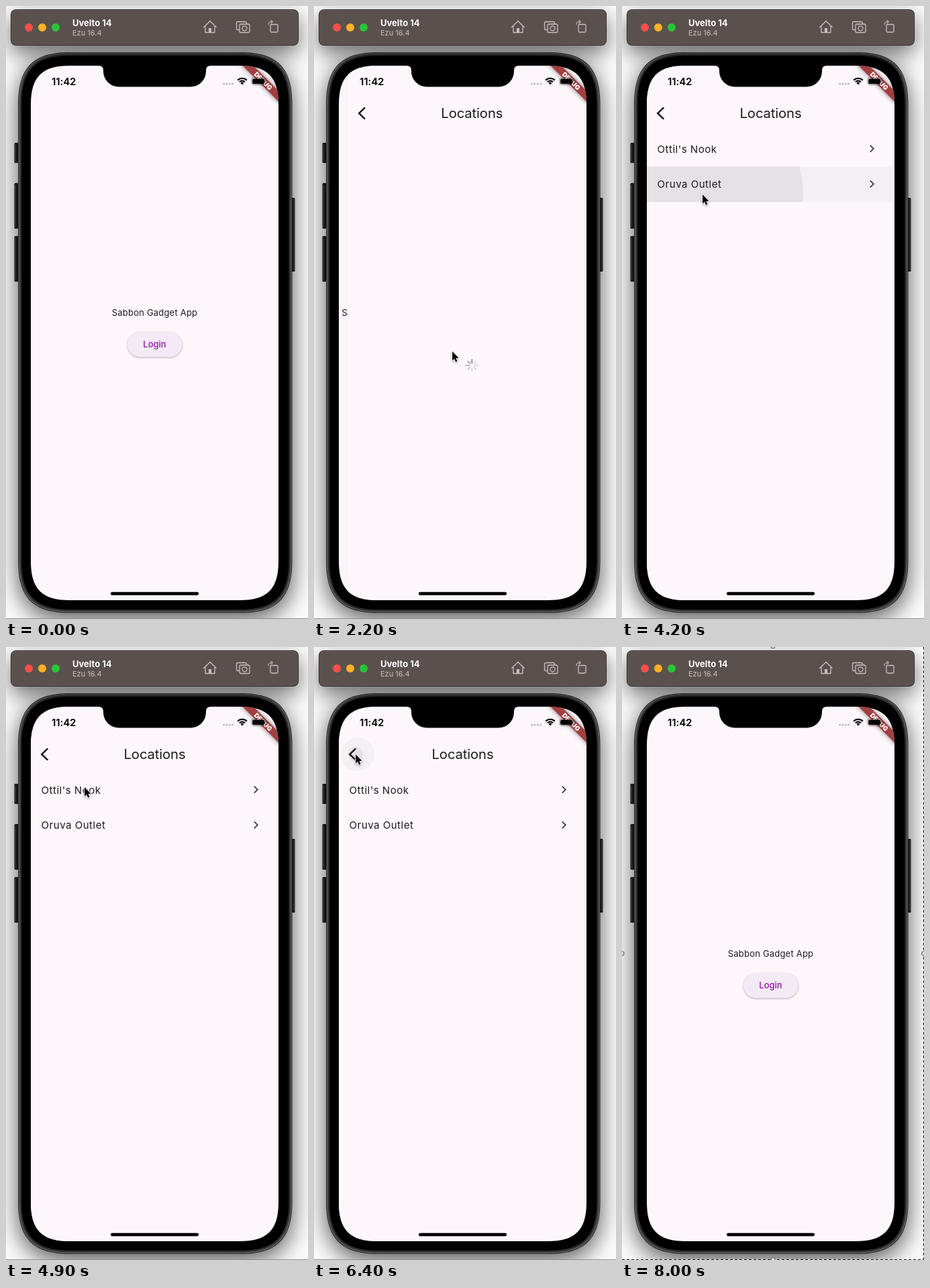
These frames come from a looping animation (450x914 px, 8.9 s). An HTML page with a canvas:

```html
<!DOCTYPE html>
<html lang="en">
<head>
<meta charset="utf-8">
<title>Phone demo</title>
<style>
html, body { margin: 0; width: 100%; height: 100%; overflow: hidden; background: #fff; }
canvas { display: block; }
</style>
</head>
<body>
<canvas id="stage" width="450" height="914"></canvas>
<script>
const ctx = document.getElementById('stage').getContext('2d');
const W = 450, H = 914, LOOP = 8900, STEP = 100;
const SCREEN = { x: 37, y: 89, w: 369, h: 797 };
const MID = SCREEN.x + SCREEN.w / 2;
const ROW = { y: 187, h: 52.6 };
const PAGE = '#fdf7fc', INK = '#1d1b1e', TOOL = '#c6c1bf';

// Pointer stops, and the glides between them
const STOP = {
  below: [230, 838], near: [201, 522], login: [206, 515],
  second: [120, 281], first: [117, 209], back: [62, 160], away: [-4, 260]
};
const GLIDES = [
  { from: 900, to: 1400, stop: STOP.near },
  { from: 1500, to: 1800, stop: STOP.login },
  { from: 2700, to: 3900, stop: STOP.second },
  { from: 4400, to: 4700, stop: STOP.first },
  { from: 5300, to: 5700, stop: STOP.back },
  { from: 6800, to: 7200, stop: STOP.away }
];

const clamp = v => Math.max(0, Math.min(1, v));
const smooth = v => v * v * (3 - 2 * v);
const lerp = (a, b, f) => a + (b - a) * f;

function pointerAt(t) {
  return GLIDES.reduce((pos, g) => {
    const f = smooth(clamp((t - g.from) / (g.to - g.from)));
    return pos.map((v, i) => lerp(v, g.stop[i], f));
  }, STOP.below);
}

// Cubic bezier .35,.91,.33,.97: quick start, long settle
function settle(x) {
  x = clamp(x);
  const at = (a, b, s) => 3 * a * s * (1 - s) ** 2 + 3 * b * s * s * (1 - s) + s ** 3;
  let lo = 0, hi = 1;
  for (let i = 0; i < 24; i++) {
    const m = (lo + hi) / 2;
    if (at(.35, .33, m) < x) lo = m; else hi = m;
  }
  return at(.91, .97, lo);
}

function layer(draw) {
  ctx.save();
  draw();
  ctx.restore();
}

function shade(color, blur, dy) {
  ctx.shadowColor = color;
  ctx.shadowBlur = blur;
  ctx.shadowOffsetY = dy;
}

const noShade = () => shade('transparent', 0, 0);

function fill(color) {
  ctx.fillStyle = color;
  ctx.fill();
}

function stroke(color, width) {
  ctx.strokeStyle = color;
  ctx.lineWidth = width;
  ctx.stroke();
}

function box(x, y, w, h, r = 0) {
  ctx.beginPath();
  ctx.roundRect(x, y, w, h, r);
}

function solid(color, ...area) {
  box(...area);
  fill(color);
}

function arc(x, y, r, a = 0, b = Math.PI * 2) {
  ctx.beginPath();
  ctx.arc(x, y, r, a, b);
}

function disc(x, y, r, color) {
  arc(x, y, r);
  fill(color);
}

function line(pts, color, width) {
  ctx.beginPath();
  pts.forEach(p => ctx.lineTo(...p));
  stroke(color, width);
}

// Rectangle whose corners bend gradually over a length of e
function squircle(x, y, w, h, e) {
  const k = e * .286;
  ctx.beginPath();
  for (let i = 0; i < 4; i++) {
    const turn = i * Math.PI / 2;
    const c = Math.round(Math.cos(turn)), s = Math.round(Math.sin(turn));
    const sx = i === 1 || i === 2 ? 1 : 0, sy = i > 1 ? 1 : 0;
    const at = (u, v) => [x + sx * w + c * u - s * v, y + sy * h + s * u + c * v];
    ctx.lineTo(...at(0, e));
    ctx.bezierCurveTo(...at(0, k), ...at(k, 0), ...at(e, 0));
  }
  ctx.closePath();
}

function text(str, x, y, size, { weight = 400, color = INK, align = 'left', gap = 0 } = {}) {
  ctx.font = `${weight} ${size}px Inter, "Liberation Sans", sans-serif`;
  ctx.letterSpacing = gap + 'px';
  ctx.textAlign = align;
  ctx.fillStyle = color;
  ctx.fillText(str, x, y);
}

function drawToolbar() {
  shade('rgba(0,0,0,.58)', 32, 11);
  solid('#2b2523', 7, 5, 429, 54, 8);
  noShade();
  solid('#6f6663', 8, 6, 427, 52, 7);
  solid('#5a514e', 8.5, 7, 426, 50.5, 6.5);
  ['#fe4f4a', '#fdb225', '#29c538'].forEach((c, i) => disc(34 + i * 20, 32, 6, c));
  text('Uvelto 14', 99, 30, 13, { weight: 700, color: '#fff' });
  text('Ezu 16.4', 99, 44.3, 11, { color: TOOL });
  ctx.lineJoin = ctx.lineCap = 'round';
  drawHouse(304, 22.5);
  drawCamera(343.5, 23.5);
  drawRotate(394, 27.5);
}

function drawHouse(x, y) {
  line([[x - 9.3, y + 9], [x, y], [x + 9.3, y + 9]], TOOL, 1.3);
  line([[x - 7, y + 7], [x - 7, y + 17], [x + 7, y + 17], [x + 7, y + 7]], TOOL, 1.3);
  solid(TOOL, x - 2, y + 10.5, 4, 6.5);
}

function drawCamera(x, y) {
  box(x, y, 15, 12, 2);
  stroke(TOOL, 1.3);
  box(x + 4.5, y + 3.5, 15, 12.5, 2);
  fill('#5a514e');
  stroke(TOOL, 1.3);
  arc(x + 12, y + 9.8, 3.5);
  stroke(TOOL, 1.3);
}

function drawRotate(x, y) {
  box(x, y, 11, 11.5, 1.5);
  stroke(TOOL, 1.3);
  arc(x + 1, y, 4, Math.PI, Math.PI * 1.5);
  stroke(TOOL, 1.2);
  line([[x + 1, y - 6], [x + 3.3, y - 4], [x + 1, y - 2]], TOOL, 1.2);
}

function drawBody() {
  const key = (x, y, h, glint) => {
    solid('#1d1d1d', x, y, 7, h, 1.5);
    solid('#4a4a4a', x + glint, y + 2, 1.5, h - 4, 1);
  };
  key(12.5, 204, 30, 1);
  key(12.5, 264, 68, 1);
  key(12.5, 343, 68, 1);
  key(423.5, 286, 110, 4.5);

  shade('rgba(0,0,0,.66)', 35, 10);
  ['#222', '#5c5c5c', '#303030', '#000'].forEach((c, i) => {
    const d = .42 * i * (i + 1);
    squircle(18 + d, 69 + d, 408.5 - 2 * d, 836 - 2 * d, 78 - d);
    fill(c);
    noShade();
  });
}

// Tap feedback clipped to a rounded box
function splash(age, area, [x, y], speed) {
  const life = 500;
  if (age <= 0 || age >= life) return;
  const fade = clamp((life - age) / 250);
  layer(() => {
    solid(`rgba(70,100,90,${.05 * fade})`, ...area);
    ctx.clip();
    disc(x, y, speed * age / 100, `rgba(0,0,0,${.06 * fade})`);
  });
}

function drawHome(t) {
  solid(PAGE, SCREEN.x, SCREEN.y, SCREEN.w, SCREEN.h);
  text('Sabbon Gadget App', MID, 462, 13, { align: 'center', gap: .2 });
  const button = [181, 486, 81.5, 37.5, 19];
  shade('rgba(0,0,0,.3)', 3, 1);
  solid('#f4eaf6', ...button);
  noShade();
  splash(t - 1700, button, STOP.login, 22);
  text('Login', MID, 509.2, 13, { weight: 500, color: '#9512a6', align: 'center' });
}

function drawSpinner(t, cx, cy) {
  const active = Math.floor((t - 2000) * 8 / 1000);
  ctx.lineCap = 'round';
  for (let i = 0; i < 8; i++) {
    const k = (i - active + 16) % 8;
    const alpha = (47 + Math.max(0, k - 3) * 25) / 255;
    const a = i * Math.PI / 4 - Math.PI / 2;
    const at = r => [cx + Math.cos(a) * r, cy + Math.sin(a) * r];
    line([at(4), at(8.6)], `rgba(60,60,68,${alpha})`, 1.9);
  }
}

function chevron(x, y, w, h, color, width) {
  ctx.lineCap = 'butt';
  ctx.lineJoin = 'miter';
  line([[x - w, y - h], [x, y], [x - w, y + h]], color, width);
}

function drawLocations(t) {
  const edge = ctx.createLinearGradient(SCREEN.x - 18, 0, SCREEN.x, 0);
  edge.addColorStop(0, 'rgba(0,0,0,0)');
  edge.addColorStop(1, 'rgba(0,0,0,.016)');
  solid(edge, SCREEN.x - 18, SCREEN.y, 18, SCREEN.h);
  solid(PAGE, SCREEN.x, SCREEN.y, SCREEN.w, SCREEN.h);

  splash(t - 6300, [40, 135, 50, 50, 25], STOP.back, 11);
  chevron(53.2, 160, -9, 8.6, INK, 2.5);
  text('Locations', MID, 167.3, 20.3, { align: 'center', gap: -.14 });

  if (t < 2600) {
    drawSpinner(t, MID, 536);
    return;
  }
  const row = i => [SCREEN.x, ROW.y + i * ROW.h, SCREEN.w, ROW.h];
  splash(t - 4000, row(1), STOP.second, 75);
  splash(t - 4900, row(0), STOP.first, 75);
  ["Ottil's Nook", 'Oruva Outlet'].forEach((name, i) => {
    const y = ROW.y + (i + .5) * ROW.h;
    text(name, 52.6, y + 5.2, 15.1, { gap: .47 });
    chevron(374.8, y - .6, 5, 5, '#464349', 1.9);
  });
}

function drawBanner() {
  layer(() => {
    ctx.translate(SCREEN.x + SCREEN.w, SCREEN.y);
    ctx.rotate(Math.PI / 4);
    shade('rgba(0,0,0,.5)', 7.5, 0);
    solid('#a23f40', -60, 26.5, 120, 11.3);
    noShade();
    text('DEBUG', 0, 35.7, 9.6, { weight: 900, color: '#fff', align: 'center' });
  });
}

function drawStatus() {
  text('11:42', 68, 118, 15, { weight: 600, color: '#000', gap: -.1 });
  for (let i = 0; i < 4; i++) disc(324.6 + i * 4.4, 116, 1.6, '#bdb9bd');

  ctx.lineCap = 'butt';
  [1.8, 5.8, 9.6].forEach(r => {
    arc(352, 117.4, r, -Math.PI * .75, -Math.PI * .25);
    stroke('#000', r < 2 ? 3.6 : 2.3);
  });

  const pale = 'rgba(0,0,0,.38)';
  box(365.5, 107, 21.5, 10.8, 3.4);
  stroke(pale, 1);
  solid('#000', 367, 108.5, 18.4, 7.8, 2);
  solid(pale, 388.2, 110.6, 1.4, 3.8, 1);
}

function drawNotch() {
  const half = 76.5, flare = 7, top = SCREEN.y;
  solid('#000', MID - half, top - 5, half * 2, 36.5, [0, 0, 23, 23]);
  [-1, 1].forEach(side => {
    const x = MID + side * half;
    ctx.beginPath();
    ctx.moveTo(x, top - 1);
    ctx.lineTo(x, top + flare);
    ctx.quadraticCurveTo(x, top, x + side * flare, top);
    fill('#000');
  });
}

function drawScreen(t) {
  const open = settle((t - 1950) / 400) - settle((t - 6500) / 400);
  layer(() => {
    squircle(SCREEN.x, SCREEN.y, SCREEN.w, SCREEN.h, 58);
    ctx.clip();
    layer(() => {
      ctx.translate(-SCREEN.w * .328 * open, 0);
      drawHome(t);
    });
    if (open > 0) layer(() => {
      ctx.translate(SCREEN.w * (1 - open), 0);
      drawLocations(t);
    });
    drawBanner();
    drawStatus();
    solid('#000', MID - 65.6, 873.8, 131.2, 4.8, 2.4);
  });
  drawNotch();
}

function drawPointer(x, y) {
  layer(() => {
    ctx.translate(x, y);
    ctx.rotate(-.39);
    ctx.lineJoin = 'round';
    const right = [[5.2, 12.6], [1.3, 11.3], [1.3, 16.6]];
    const left = right.map(([u, v]) => [-u, v]).reverse();
    shade('rgba(0,0,0,.35)', 3, 1);
    line([[0, 0], ...right, ...left, [0, 0]], '#fff', 2);
    noShade();
    fill('#000');
  });
}

function drawSelection() {
  const right = W - .5, bottom = H - .5;
  layer(() => {
    ctx.lineCap = 'butt';
    [[right, 0], [0, bottom]].forEach(from => {
      const side = [from, [right, bottom]];
      ctx.setLineDash([]);
      line(side, '#e8e8e8', 1);
      ctx.setLineDash([4, 3]);
      line(side, '#111', 1);
    });
  });
  [[W / 2, -1], [W / 2, bottom], [0, H / 2], [right, H / 2]].forEach(([x, y]) => {
    disc(x, y, 3.6, '#777');
    disc(x, y, 2.2, '#e6e6e6');
  });
}

function draw(t) {
  noShade();
  solid('#fcfcfc', 0, 0, W, H);
  drawBody();
  drawToolbar();
  drawScreen(t);
  solid('#8b8b8b', 0, H - 1, W, 1);
  if (t >= 7600) drawSelection();
  if (t >= 900 && t < 7300) drawPointer(...pointerAt(t));
}

const start = performance.now();
let shown = -1;

function tick() {
  const t = Math.floor((performance.now() - start) % LOOP / STEP) * STEP;
  if (t !== shown) draw(shown = t);
  requestAnimationFrame(tick);
}
tick();
</script>
</body>
</html>
```
